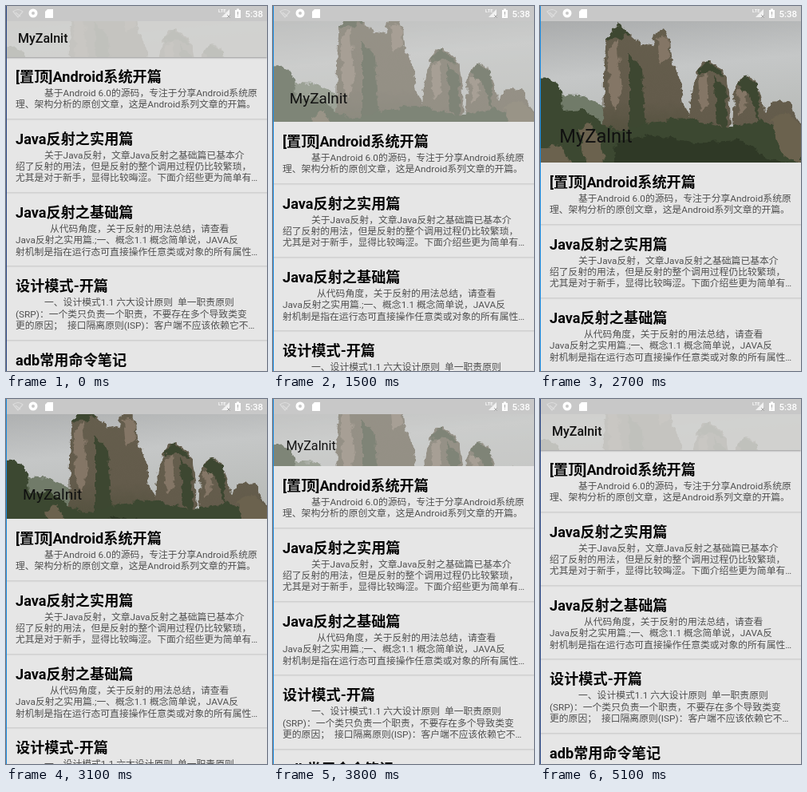
Animation of 327x457 px, one loop 5200 ms. Source, as an HTML page:

```html
<!DOCTYPE html>
<html lang="zh-CN">
<head>
<meta charset="utf-8">
<title>Collapsing header</title>
<style>
  html, body { margin: 0; width: 100%; height: 100%; overflow: hidden; }
  body {
    position: relative;
    background: #e6e6e6;
    font-family: Roboto, "Noto Sans CJK SC", "Noto Sans CJK", sans-serif;
  }
  #edge { position: absolute; left: 0; top: 0; width: 1px; height: 100%; z-index: 4; }
  #status { position: absolute; left: 0; top: 0; z-index: 3; }
  #header {
    position: absolute; left: 0; top: 0; width: 327px;
    overflow: hidden; z-index: 2; background: #e6e6e6;
  }
  #photo { position: absolute; left: 0; top: 0; }
  #scrim { position: absolute; inset: 0; background: #d4d4d1; }
  #title {
    position: absolute; left: 0; top: 0;
    line-height: 32px; white-space: pre; color: #101010;
  }
  #list { position: absolute; left: 0; top: 0; width: 327px; margin-top: -.4px; }
  article {
    padding: 12.9px 0 10.6px 12px;
    border-bottom: 1px solid #d0d0d0;
    box-shadow: 0 1px 1px #dadada;
  }
  h2 { margin: 0; font-size: 18.17px; line-height: 24px; font-weight: 700; color: #060606; white-space: pre; }
  p { margin: 1px 0 0; font-size: 11.82px; line-height: 14.3px; color: #505050; white-space: pre; }
</style>
</head>
<body>
<div id="list"></div>

<div id="header">
  <svg id="photo" width="327" height="218" viewBox="0 0 327 218">
    <defs>
      <linearGradient id="sky" x1="0" y1="0" x2=".15" y2="1">
        <stop offset="0" stop-color="#a0a2a3"/>
        <stop offset=".45" stop-color="#c5c7c7"/>
        <stop offset="1" stop-color="#b2b5b1"/>
      </linearGradient>
      <linearGradient id="rock" x1="0" y1="0" x2="0" y2="1">
        <stop offset="0" stop-color="#655e4d"/>
        <stop offset=".5" stop-color="#635b4b"/>
        <stop offset="1" stop-color="#41452f"/>
      </linearGradient>
      <filter id="rough" x="-5%" y="-5%" width="110%" height="110%" color-interpolation-filters="sRGB">
        <feTurbulence type="fractalNoise" baseFrequency=".1" numOctaves="3" seed="4"/>
        <feDisplacementMap in="SourceGraphic" scale="10" xChannelSelector="R" yChannelSelector="G"/>
        <feGaussianBlur stdDeviation=".6"/>
      </filter>
    </defs>
    <rect width="327" height="218" fill="url(#sky)"/>
    <g filter="url(#rough)">
      <path fill="#717b69" d="M20 118L50 119 82 132 82 165 20 165Z"/>
      <g fill="url(#rock)">
        <path d="M78 225L80 95 84 48 98 27 112 42 124 53 139 58 146 40 155 34 162 50 164 72 173 90 180 130 190 150 190 225Z"/>
        <path d="M184 225L188 130 194 92 202 80 212 75 222 82 233 94 238 130 241 225Z"/>
        <path d="M238 225L243 118 247 103 258 94 270 100 275 118 281 140 290 128 312 126 320 145 327 155 335 225Z"/>
      </g>
      <path fill="#847666" d="M86 62L96 50 102 110 95 140 87 120ZM147 48L160 46 162 72 150 80ZM198 97L208 90 212 130 201 140ZM248 112L256 106 259 135 250 145Z"/>
      <path fill="#3d4731" d="M84 48L98 27 111 41 102 49ZM112 65L128 85 132 170 112 165ZM196 90L210 75 230 93 212 90ZM218 95L232 108 236 165 222 155ZM246 106L258 94 272 104 276 160 264 120Z"/>
      <path fill="#3c4831" d="M-5 97L14 96 26 112 29 138 52 136 78 153 100 165 140 152 185 146 230 160 280 150 300 163 335 180 335 230 -5 230Z"/>
      <path fill="#6b624e" d="M50 163L62 152 76 175 80 203 60 210ZM288 150L312 140 328 160 328 208 302 190ZM-5 186L25 180 40 205 -5 219Z"/>
      <path fill="#2f3926" d="M95 178L140 168 195 178 250 175 290 200 335 208 335 230 90 230Z"/>
    </g>
  </svg>
  <div id="scrim"></div>
  <div id="title">MyZalnit</div>
</div>

<svg id="status" width="327" height="19" viewBox="0 0 327 19">
  <rect width="327" height="19" fill="#c8c8c8"/>
  <path d="M9 7Q15 2 21 7L15 14ZM12 8L18 13" fill="none" stroke="#dcdcdc" stroke-width="1.2"/>
  <g fill="#fff">
    <path d="M52 4H59V15H49V7Z"/>
    <path d="M280 4V14H270Z" opacity=".75"/>
    <path d="M287 5H289V3.500H292V5H294V15H287Z"/>
    <circle cx="34" cy="9" r="5.500"/>
    <text x="299.500" y="13.500" font-size="11.500" font-weight="500">5:38</text>
    <text x="266" y="8" font-size="6" font-weight="500">LTE</text>
  </g>
  <circle cx="34" cy="9" r="2" fill="#c8c8c8"/>
  <path d="M277 11L281 15M281 11L277 15M290.500 7V11M290.500 12V13" stroke="#aaa"/>
</svg>
<div id="edge"></div>

<script>
const LOOP = 5200, STEP = 100, RANGE = 155, COLLAPSED = 64;
const PARALLAX = 0.3, SCRIM_MAX = 0.87;
const $ = id => document.getElementById(id);
const clamp = (v, lo, hi) => Math.min(hi, Math.max(lo, v));
const mix = (a, b, k) => a + (b - a) * k;
const cubic = (n, a, b, c) => n * (a + n * (b + n * c));

const indent = px => `<span style="padding-left:${px}px"></span>`;
const posts = [
  ["[置顶]Android系统开篇", 36,
    "基于Android 6.0的源码，专注于分享Android系统原",
    "理、架构分析的原创文章，这是Android系列文章的开篇。"],
  ["Java反射之实用篇", 36,
    "关于Java反射，文章Java反射之基础篇已基本介",
    "绍了反射的用法，但是反射的整个调用过程仍比较繁琐，",
    "尤其是对于新手，显得比较晦涩。下面介绍些更为简单有…"],
  ["Java反射之基础篇", 43,
    "从代码角度，关于反射的用法总结，请查看",
    "Java反射之实用篇.;一、概念1.1 概念简单说，JAVA反",
    "射机制是指在运行态可直接操作任意类或对象的所有属性…"],
  ["设计模式-开篇", 36,
    "一、设计模式1.1 六大设计原则  单一职责原则",
    "(SRP)：一个类只负责一个职责，不要存在多个导致类变",
    "更的原因；  接口隔离原则(ISP)：客户端不应该依赖它不…"],
  ["adb常用命令笔记", 36, ""]
];
$("list").innerHTML = posts.map(([head, gap, ...lines]) =>
  `<article><h2>${head}</h2><p>${indent(gap)}${lines.join("\n")}</p></article>`).join("");

// Drag distance: pulled open from 600 ms, pushed shut from 2600 ms.
function pulled(t) {
  const up = clamp((t - 600) / STEP + 1, 0, 15);
  const down = clamp((t - 2600) / STEP + 1, 0, 17);
  const open = cubic(up, 2.833, 0.58, -0.00533);
  return clamp(open - cubic(down, 11.34, 0.1127, -0.01432), 0, RANGE);
}

function scrimAlpha(t) {
  const fade = t < 2600 ? 1 - (t - 1200) / 600 : (t - 3500) / 600;
  return SCRIM_MAX * clamp(fade, 0, 1);
}

function draw(t) {
  const d = Math.round(pulled(t)), p = d / RANGE;
  const height = COLLAPSED + d;
  $("header").style.height = height + "px";
  $("header").style.boxShadow = d ? "none" : "0 1px 2px rgba(0,0,0,.35)";
  $("list").style.transform = `translateY(${height}px)`;
  $("photo").style.transform = `translateY(${-PARALLAX * (RANGE - d)}px)`;
  $("scrim").style.opacity = scrimAlpha(t);
  const title = $("title").style;
  title.transform = `translate(${mix(15, 26, p)}px, ${mix(25, 168, p)}px)`;
  title.fontSize = mix(16, 26.6, p * p) + "px";
  title.fontWeight = d ? 400 : 500;
  $("edge").style.background = t >= 600 && t < 5100 ? "#1c8ce0" : "#2b4784";
}

const start = performance.now();
function tick() {
  const t = (performance.now() - start) % LOOP;
  draw(Math.floor(t / STEP) * STEP);
  requestAnimationFrame(tick);
}
tick();
</script>
</body>
</html>
```
